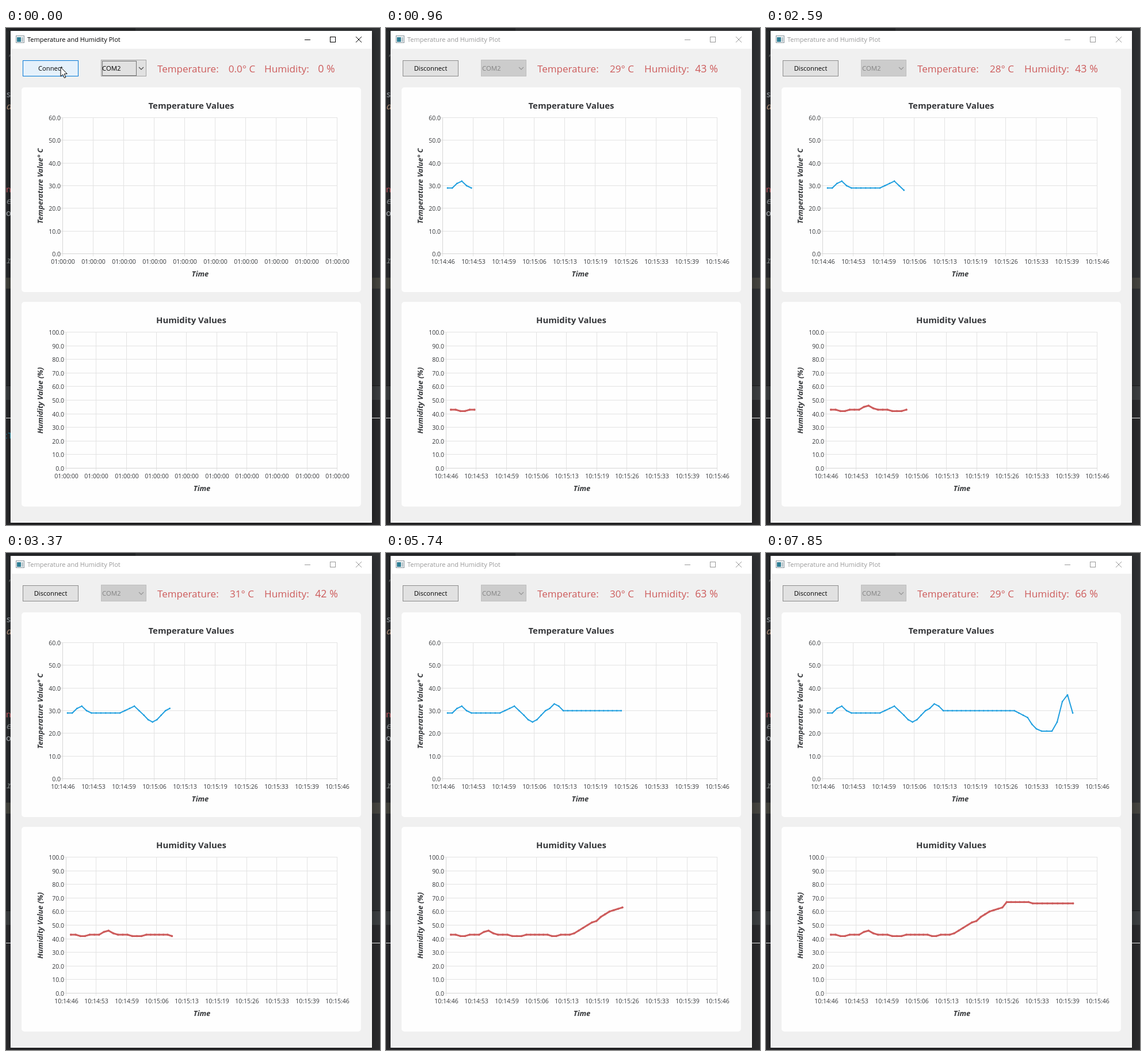
An HTML page with a canvas that plays this animation: 650 by 862 pixels, repeating every 8000 ms.

```html
<!DOCTYPE html>
<html lang="en">
<head>
<meta charset="utf-8">
<title>Temperature and Humidity Plot</title>
<style>
html, body { margin: 0; width: 100%; height: 100%; overflow: hidden; background: #2f3133; }
canvas { display: block; width: 650px; height: 862px; }
</style>
</head>
<body>
<canvas id="stage" width="650" height="862"></canvas>
<script>
const LOOP = 8000;
const CONNECT = 130, BLUR = 400;
const READINGS = 54;
const SANS = '"Open Sans", "Noto Sans", sans-serif';
const MONO = '"Noto Sans Mono", "DejaVu Sans Mono", monospace';
const ctx = document.getElementById('stage').getContext('2d');

// Linear interpolation of column col between knots [index, ...values]
function lerp(knots, i, col = 1) {
  const k = Math.max(1, knots.findIndex(p => p[0] >= i));
  const a = knots[k - 1], b = knots[k];
  return a[col] + (b[col] - a[col]) * (i - a[0]) / (b[0] - a[0]);
}
const series = (knots, col) => Array.from({ length: READINGS }, (_, i) => lerp(knots, i, col));

// [reading, ms on screen, logged second]: about one reading per second
const pace = [[0, 260, 1], [5, 960, 6.2], [16, 2590, 17.7], [22, 3370, 23.35],
  [32, 4770, 33.2], [46, 6740, 46.65], [53, 7850, 54.6]];
const times = series(pace, 1), secs = series(pace, 2);

// The sensors report whole numbers
const temps = series([[0, 29], [1, 29], [3, 32], [5, 28.8], [11, 29], [14, 32], [16, 27.8],
  [18, 24.6], [21, 29.8], [23, 32.9], [25, 30.2], [41, 30], [44, 27], [46, 21.6], [49, 21],
  [50, 25], [51, 34], [52, 37], [53, 29]]).map(Math.round);
const humids = series([[0, 43], [2, 42.4], [3, 42.4], [4, 43], [6, 43], [8, 46], [10, 42.8],
  [14, 42.2], [18, 42.8], [21, 43], [22, 42.4], [26, 42.6], [32, 53.4], [35, 60], [38, 63.4],
  [39, 67], [46, 66.3], [53, 66]]).map(Math.round);

const charts = [
  { top: 103, x0: 99, y0: 156, y1: 392, max: 60, title: 'Temperature Values',
    unit: 'Temperature Value° C', data: temps, color: '#209fdf', width: 2 },
  { top: 475, x0: 105, y0: 528, y1: 764, max: 100, title: 'Humidity Values',
    unit: 'Humidity Value (%)', data: humids, color: '#cd5c5c', width: 3 }
];
const X1 = 576;

function rect(x, y, w, h, fill, stroke) {
  ctx.fillStyle = fill;
  ctx.fillRect(x, y, w, h);
  if (stroke) {
    ctx.strokeStyle = stroke;
    ctx.lineWidth = 1;
    ctx.strokeRect(x + .5, y + .5, w - 1, h - 1);
  }
}

function path(points, color, width) {
  ctx.beginPath();
  points.forEach(([x, y]) => ctx.lineTo(x, y));
  ctx.strokeStyle = color;
  ctx.lineWidth = width;
  ctx.stroke();
}

function text(str, x, y, size, color, align = 'left', style = '', family = SANS) {
  ctx.font = `${style} ${size}px ${family}`;
  ctx.textAlign = align;
  ctx.fillStyle = color;
  ctx.fillText(str, x, y);
}

function desktop(t) {
  rect(0, 0, 650, 862, '#2f3133');
  rect(0, 0, 225, 6, '#242628');
  rect(0, 6, 9, 856, '#292b2d');
  rect(0, 433, 650, 19, '#45453f');
  rect(0, 621, 650, 24, '#3c3f41');
  rect(0, 620, 650, 1, '#1c1c1c');
  rect(0, 645, 650, 217, '#2b2b2d');
  const code = (s, x, y, color, style) => text(s, x, y, 15, color, 'left', style, MONO);
  code('"', 1, 57, '#858b8b', 'italic');
  code('s', 0, 120, '#a9b0b6');
  code('d', 0, 141, '#c09a80', 'italic');
  code('n', 0, 285, '#c75a62');
  code('e', 0, 305, '#8d9296', 'italic');
  code('o', 0, 326, '#b3b9be');
  code('r', 0, 408, '#858b8b', 'italic');
  if (t < CONNECT) code('cT', -6, 712, '#1f93ad');
}

function frame(active) {
  ctx.save();
  ctx.shadowColor = active ? 'rgba(0,0,0,.45)' : 'rgba(0,0,0,.3)';
  ctx.shadowBlur = 14;
  ctx.shadowOffsetY = 3;
  rect(8, 5, 628, 853, '#fff');
  ctx.restore();
  rect(9, 36, 626, 821, '#f0f0f0');
  // Divider visible on both sides of the window
  rect(0, 676, 8, 1, '#e6e6e6');
  rect(636, 676, 14, 1, '#e6e6e6');
}

function titleBar(active) {
  const ink = active ? '#000' : '#999';
  rect(17, 13, 15, 13, '#f4f6f7', '#8c979d');
  rect(19, 16, 7, 8, '#2f7f95');
  rect(27, 16, 3, 8, '#b9c6cc');
  text('Temperature and Humidity Plot', 37, 24, 11.05, ink);
  path([[519, 20.5], [529, 20.5]], ink, 1);
  ctx.strokeRect(563.5, 15.5, 9, 9);
  path([[608, 15], [618, 25]], ink, 1);
  path([[618, 15], [608, 25]], ink, 1);
}

function controls(on, hover, count) {
  rect(29, 56, 97, 28, hover ? '#e5f1fb' : '#e1e1e1', hover ? '#0078d7' : '#8c8c8c');
  text(on ? 'Disconnect' : 'Connect', 77.5, 74, 11.2, '#000', 'center');

  rect(165, 55, 79, 29, on ? '#ccc' : '#e1e1e1', on ? '#bfbfbf' : '#a5a5a5');
  if (!on) {
    ctx.setLineDash([1, 1]);
    ctx.strokeStyle = '#000';
    ctx.strokeRect(167.5, 57.5, 59, 25);
    ctx.setLineDash([]);
  }
  text('COM2', 167, 74, 11.4, on ? '#838383' : '#000');
  path([[231, 68], [235, 72], [239, 68]], on ? '#949494' : '#444', 1.1);

  const red = '#cd5c5c';
  const temp = count ? temps[count - 1] : '0.0';
  const humid = count ? humids[count - 1] : '0';
  text('Temperature:', 263, 77, 17, red);
  text(temp + '° C', 410, 77, 17, red, 'center');
  text('Humidity:', 449, 77, 17.2, red);
  text(humid + ' %', 557, 77, 17.8, red, 'center');
}

function clock(i, on) {
  if (!on) return '01:00:00';
  const s = Math.floor(14 * 60 + 46.5 + i * 60 / 9);
  const two = n => String(n).padStart(2, '0');
  return `10:${two(Math.floor(s / 60))}:${two(s % 60)}`;
}

function chart(c, on, count) {
  const { x0, y0, y1 } = c;
  const ink = '#35373a', grid = '#e3e3e3';
  ctx.beginPath();
  ctx.roundRect(27, c.top, 590, 355, 5);
  ctx.fillStyle = '#fefefe';
  ctx.fill();

  for (let i = 0; i < 10; i++) {
    const x = Math.round(x0 + i * (X1 - x0) / 9) - .5;
    path([[x, y0], [x, y1 + 4]], grid, 1);
    text(clock(i, on), x + .5, y1 + 17, 10.5, ink, 'center');
  }
  const rows = c.max / 10;
  for (let i = 0; i <= rows; i++) {
    const y = Math.round(y1 - i * (y1 - y0) / rows) - .5;
    path([[x0 - 4, y], [X1, y]], grid, 1);
    text((i * 10).toFixed(1), x0 - 4, y + 4.5, 10.5, ink, 'right');
  }
  path([[x0 - .5, y0], [x0 - .5, y1 - .5], [X1, y1 - .5]], '#d6d6d6', 1);

  text(c.title, 322, c.top + 36.5, 14.9, ink, 'center', 'bold');
  text('Time', (x0 + X1) / 2, y1 + 38.5, 12.8, ink, 'center', 'italic bold');
  ctx.save();
  ctx.translate(63.5, (y0 + y1) / 2);
  ctx.rotate(-Math.PI / 2);
  text(c.unit, 0, 0, 12.8, ink, 'center', 'italic bold');
  ctx.restore();

  if (count > 1) plot(c, count);
}

function plot({ x0, y0, y1, max, data, color, width }, count) {
  const pts = data.slice(0, count).map((v, i) =>
    [x0 + secs[i] * (X1 - x0) / 60, y1 - v * (y1 - y0) / max - .5]);
  ctx.save();
  ctx.lineJoin = 'round';
  ctx.lineCap = 'square';
  path(pts, color, width);
  ctx.restore();
  ctx.fillStyle = color;
  for (const [x, y] of pts) {
    ctx.beginPath();
    ctx.arc(x, y, width / 2 + .3, 0, 7);
    ctx.fill();
  }
}

function pointer(t) {
  const k = Math.max(0, (t - 200) / (BLUR - 200));
  if (k >= 1) return;
  ctx.save();
  ctx.translate(95 - 107 * k, 68 + 22 * k);
  ctx.beginPath();
  [[0, 0], [0, 16], [3.7, 12.6], [6.4, 18.6], [8.9, 17.5], [6.3, 11.7], [11.2, 11.4]]
    .forEach(([x, y]) => ctx.lineTo(x, y));
  ctx.closePath();
  ctx.fillStyle = '#fff';
  ctx.strokeStyle = '#000';
  ctx.lineWidth = 1;
  ctx.fill();
  ctx.stroke();
  ctx.restore();
}

function draw(t) {
  const on = t >= CONNECT, active = t < BLUR;
  const count = times.filter(ms => ms <= t + .5).length;
  desktop(t);
  frame(active);
  titleBar(active);
  controls(on, t < 260, count);
  charts.forEach(c => chart(c, on, count));
  pointer(t);
}

let start;
function tick(now) {
  start ??= now;
  draw((now - start) % LOOP);
  requestAnimationFrame(tick);
}
draw(0);
requestAnimationFrame(tick);
</script>
</body>
</html>
```
